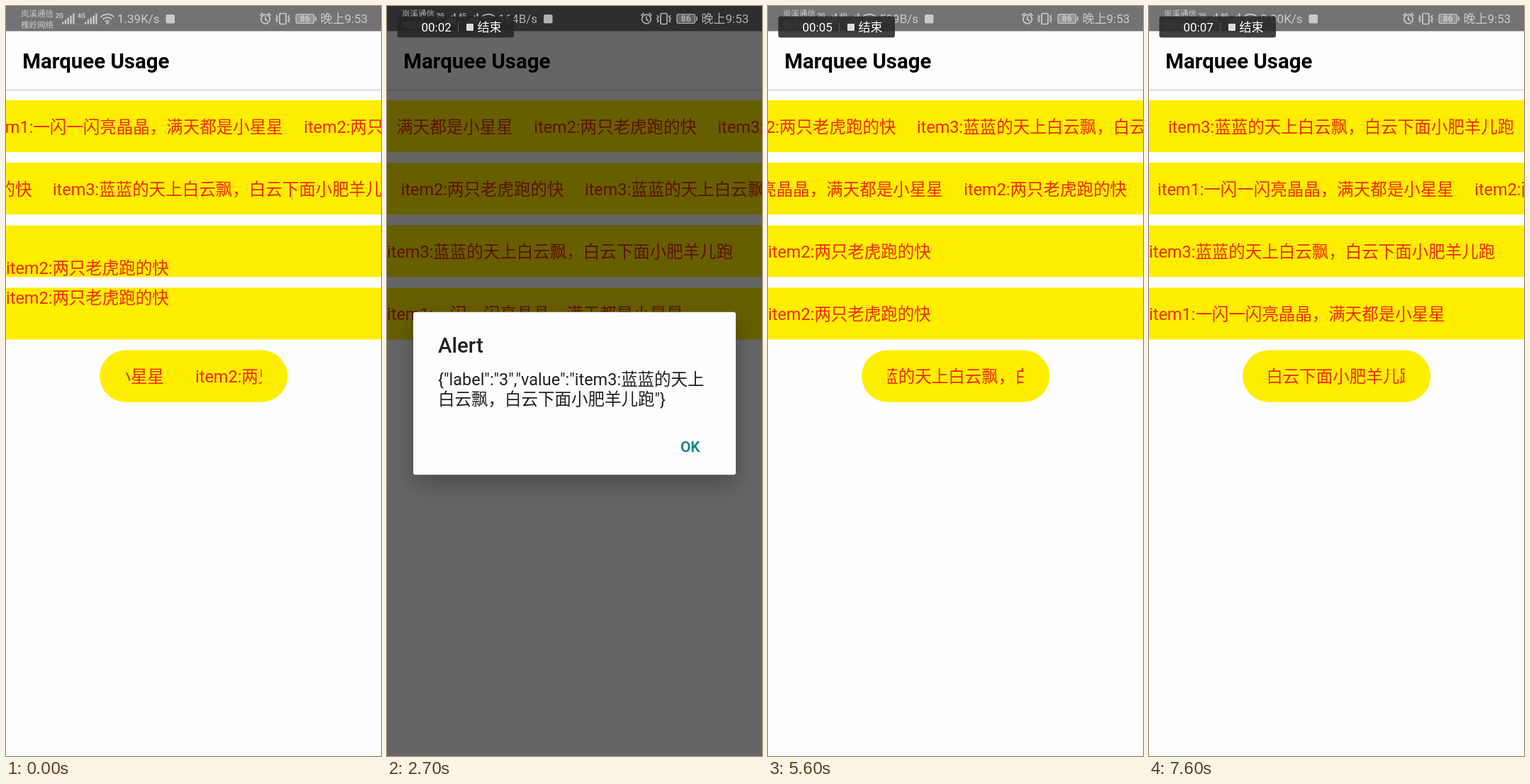
These frames come from a looping animation (529 px wide and 1058 px high, 7700 ms). An HTML page:

```html
<!DOCTYPE html>
<html lang="zh-CN">
<head>
<meta charset="utf-8">
<title>Marquee Usage</title>
<style>
  html, body { margin: 0; width: 100%; height: 100%; overflow: hidden; background: #fefdfe; }
  #stage { display: block; width: 100vw; height: 100vh; }
  text { font: 23.5px Roboto, "Noto Sans CJK SC", "Noto Sans CJK", sans-serif; white-space: pre; }
  .han { font-weight: 300; }
  .item { fill: #ef2a0c; }
  .bar { fill: #ffee00; }
  #status text, #recorder text { font-size: 17px; }
  #status .carrier { font-size: 11.5px; }
  #status .net { font-size: 8.5px; font-weight: 700; }
  #status .level { font-size: 12px; font-weight: 700; text-anchor: middle; }
  .line { fill: none; stroke: #fff; stroke-width: 1.7; }
  .title { font-size: 29.4px; font-weight: 700; }
  #dialog { filter: drop-shadow(0 12px 15px rgba(0, 0, 0, .27)); }
  #dialog text { fill: #212121; }
  #dialog .head { font-size: 29.4px; font-weight: 500; }
  #dialog .ok { font-size: 20.6px; font-weight: 500; fill: #0f8080; }
</style>
</head>
<body>
<svg id="stage" viewBox="0 0 529 1058">
  <rect width="529" height="1058" fill="#fefdfe"/>
  <rect width="529" height="35.5" fill="#757275"/>
  <text class="title" x="23.3" y="88">Marquee Usage</text>
  <rect y="117.5" width="529" height="1.5" fill="#dad9da"/>
  <rect y="119" width="529" height="1.5" fill="#f1f0f1"/>
  <g id="rows"></g>
  <rect class="bar" x="132.2" y="485.4" width="265" height="73.4" rx="36.7"/>
  <svg x="168.9" y="485.4" width="191.8" height="73.4"><g id="pill"></g></svg>

  <rect id="dim" width="529" height="1058"/>
  <g id="dialog">
    <rect id="card" x="37" width="455" rx="3" fill="#fefdfe"/>
    <g id="words"></g>
  </g>

  <g id="status" fill="#fff" opacity=".62">
    <text class="carrier" x="21" y="14.5">岚溪通信</text>
    <text class="carrier" x="21" y="30.5">槐岭网络</text>
    <text class="net" x="70" y="17">2G</text>
    <text class="net" x="101" y="17">4G</text>
    <g id="signal"></g>
    <text id="speed" x="157" y="24"></text>
    <rect id="mark" y="12" width="12.5" height="12.5" rx="2"/>
    <g class="line">
      <circle cx="366" cy="18.5" r="6.3"/>
      <path d="M366 14.5v4.5l3 2M358.5 13.5l4-3.5M373.5 13.5l-4-3.5"/>
      <rect x="386" y="10.5" width="9" height="15" rx="1.5"/>
      <path d="M381 13l2 2.5-2 2.5 2 2.5-2 2.5M400 13l-2 2.5 2 2.5-2 2.5 2 2.5"/>
      <rect x="409" y="11.5" width="25.5" height="13" rx="2.5" stroke-width="1.2" fill="#fff" fill-opacity=".4"/>
      <path d="M437 15v6"/>
    </g>
    <text class="level" x="421.7" y="22.3">86</text>
    <text x="443.5" y="24">晚上9:53</text>
  </g>

  <g id="recorder" fill="#fff">
    <rect x="14.5" y="14.5" width="164.5" height="30" rx="3" fill="#262626" fill-opacity=".88"/>
    <circle id="dot" cx="37" cy="30" r="6" fill="#ff5414"/>
    <text id="clock" x="48.5" y="36"></text>
    <path d="M100.5 23v14" stroke="#555"/>
    <rect x="112" y="25" width="10" height="10" rx="1" fill="#ddd"/>
    <text x="127.5" y="36">结束</text>
  </g>
</svg>
<script>
const LOOP = 7700, FRAME = 100;
const ROW_TOP = 133, PITCH = 88.1, ROW_H = 73.4, BASE = 46;
const FLIP = 1782, FLIP_LEAD = 241, FLIP_TIME = 400;
const FADE = 200;

const items = [
  'item1:一闪一闪亮晶晶，满天都是小星星',
  'item2:两只老虎跑的快',
  'item3:蓝蓝的天上白云飘，白云下面小肥羊儿跑'
];
const widths = [417.8, 229.8, 488.3];
const cut = 'item3:蓝蓝的天上白云飘白云下面小肥羊儿跑羊儿…';

const alerts = [
  { open: 2150, close: 2900, lines: ['{"label":"3","value":"item3:蓝蓝的天上', '白云飘，白云下面小肥羊儿跑"}'] },
  { open: 4400, close: 5150, lines: ['{"label":"3","value":"item3:蓝蓝的天上', '白云飘白云下面小肥羊儿跑羊儿哪里', '跑。"}'] },
  { open: 6000, close: 7100, lines: ['{"label":"2","value":"item2:两只老虎跑', '的快"}'] }
];
const speeds = [[7200, '0.00K/s', 225.5], [4200, '599B/s', 221], [1100, '164B/s', 221], [0, '1.39K/s', 225.5]];
// Distance scrolled so far: [time, px]
const travel = [[0, 0], [1200, 88], [2700, 213], [3600, 297], [4800, 399.5], [6400, 539.5], [7600, 652.5]];

const $ = id => document.getElementById(id);
const clamp = v => Math.max(0, Math.min(1, v));
const ease = p => p < .5 ? 2 * p * p : 1 - 2 * (1 - p) ** 2;
// Chinese runs are set in a lighter weight than the Latin ones
const thin = s => s.replace(/[\u3000-\uffef]+/g, '<tspan class="han">$&</tspan>');
const label = (s, x, y, cls) => `<text x="${x}" y="${y}" class="${cls}">${thin(s)}</text>`;
const move = (id, x, y) => $(id).setAttribute('transform', `translate(${x} ${y})`);

function strip(gap) {
  let x = 0;
  return items.map((s, i) => {
    const out = label(s, x, BASE, 'item');
    x += widths[i] + gap;
    return out;
  }).join('');
}

function distance(t) {
  const i = Math.max(1, travel.findIndex(k => k[0] >= t));
  const [t0, d0] = travel[i - 1], [t1, d1] = travel[i];
  return d0 + (d1 - d0) * (t - t0) / (t1 - t0);
}

function build() {
  for (let i = 0; i < 4; i++) {
    $('rows').innerHTML += `<svg y="${ROW_TOP + PITCH * i}" width="529" height="${ROW_H}">
      <rect class="bar" width="529" height="${ROW_H}"/><g id="row${i}">${i < 2 ? strip(29.4) : ''}</g></svg>`;
  }
  $('pill').innerHTML = strip(44.1);

  let marks = '';
  for (const x of [79, 111]) {
    for (let i = 0; i < 5; i++) {
      const h = 3 * i + 3;
      marks += `<rect x="${x + 3.8 * i}" y="${25.5 - h}" width="2.4" height="${h}"/>`;
    }
  }
  for (const r of [4.5, 9, 13.5]) {
    const k = .7 * r;
    marks += `<path class="line" d="M${143 - k} ${25 - k}A${r} ${r} 0 0 1 ${143 + k} ${25 - k}"/>`;
  }
  $('signal').innerHTML = marks + '<circle cx="143" cy="24" r="1.8"/>';
}

function drawFlips(t) {
  const n = Math.floor((t + FLIP_LEAD) / FLIP);
  const left = ROW_H * (1 - ease(clamp((t + FLIP_LEAD - n * FLIP) / FLIP_TIME)));
  const up = items, down = [items[0], items[1], cut];
  const pair = (now, before, dir) =>
    label(now, 0, BASE + dir * left, 'item') +
    (left ? label(before, 0, BASE + dir * (left - ROW_H), 'item') : '');
  $('row2').innerHTML = pair(up[(n + 1) % 3], up[n % 3], 1);
  $('row3').innerHTML = pair(down[(10 - n) % 3], down[(11 - n) % 3], -1);
}

function drawAlert(t) {
  const a = alerts.find(a => t > a.open && t < a.close + FADE);
  const shown = a ? Math.min(clamp((t - a.open) / FADE), 1 - clamp((t - a.close) / FADE)) : 0;
  $('dim').setAttribute('opacity', .6 * shown);
  $('dialog').setAttribute('opacity', shown);
  if (!a) return;
  const h = a.lines.length > 2 ? 247.5 : 229.5, top = 546.5 - h / 2, okY = top + h - 32.4;
  $('card').setAttribute('y', top);
  $('card').setAttribute('height', h);
  $('words').innerHTML = label('Alert', 72, top + 57.5, 'head') +
    a.lines.map((s, i) => label(s, 72, top + 103 + 28.2 * i, '')).join('') +
    `<g opacity=".25">${label('OK', 415.5, okY + 1.5, 'ok')}</g>` + label('OK', 414, okY, 'ok');
  const z = t < a.close ? .9 + .1 * shown : 1;
  $('dialog').setAttribute('transform', `translate(264.5 546.5) scale(${z}) translate(-264.5 -546.5)`);
}

function draw(t) {
  const d = distance(t);
  move('row0', -27 - d, 0);
  move('row1', d - 640.5, 0);
  move('pill', -363.8 - d, 0);
  drawFlips(t);
  drawAlert(t);

  const [, speed, markX] = speeds.find(s => t >= s[0]);
  $('speed').textContent = speed;
  $('mark').setAttribute('x', markX);

  $('recorder').setAttribute('opacity', clamp((t - 200) / FADE));
  $('clock').textContent = '00:0' + Math.max(0, Math.floor((t - 300) / 1000));
  $('dot').setAttribute('opacity', (t + 100) % 1000 < 500 ? 1 : 0);
}

let start;
function tick(now) {
  start ??= now;
  draw(Math.floor((now - start) % LOOP / FRAME) * FRAME);
  requestAnimationFrame(tick);
}
build();
draw(0);
requestAnimationFrame(tick);
</script>
</body>
</html>
```
